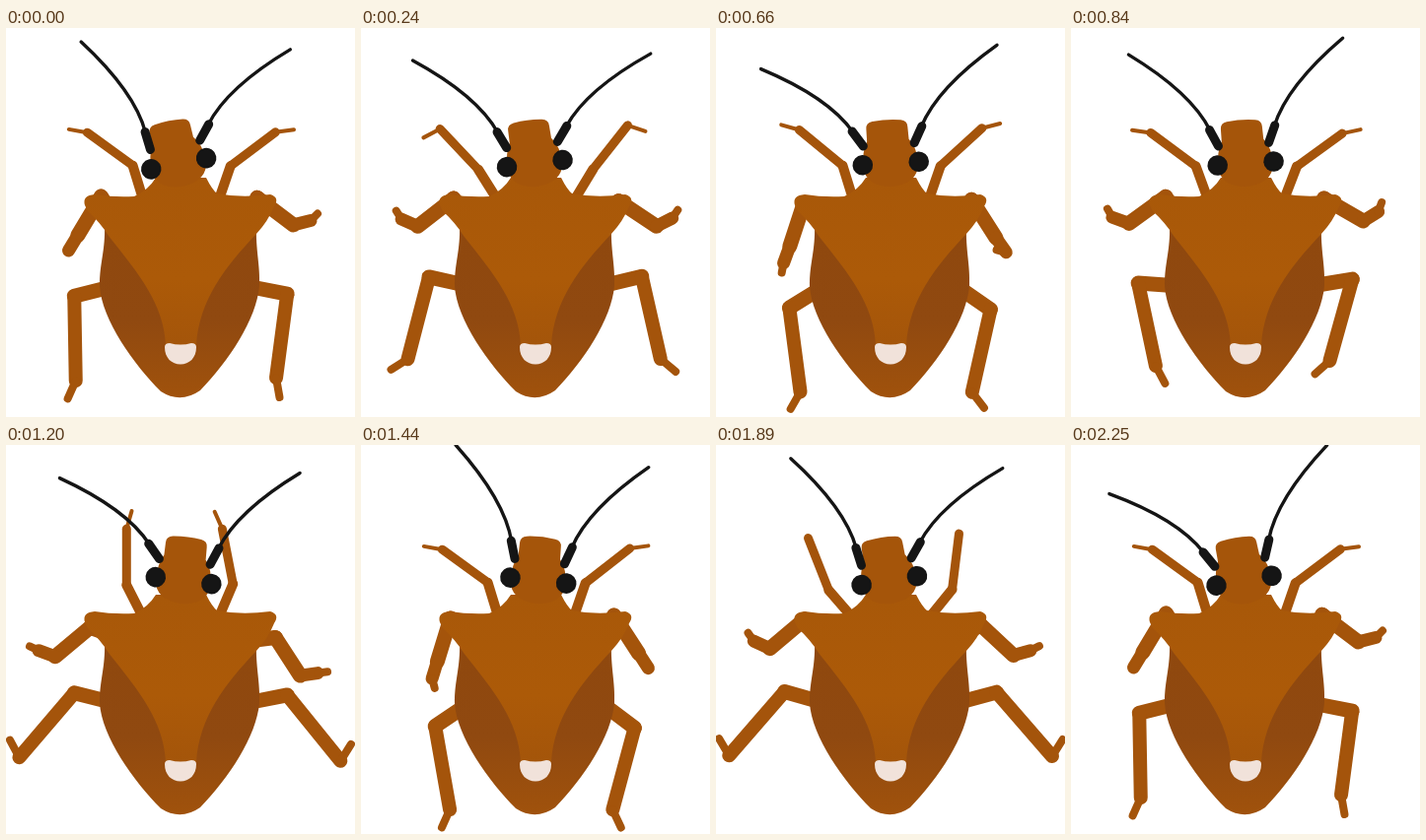
These frames come from a looping animation (354 px wide and 395 px high, 2.28 s). An HTML page:

```html
<!DOCTYPE html>
<html lang="en">
<head>
<meta charset="utf-8">
<title>Walking bug</title>
<style>
  html, body { margin: 0; width: 100%; height: 100%; overflow: hidden; background: #fff; }
  svg { display: block; width: 354px; height: 395px; }
  #legs line { stroke: #a4540b; stroke-linecap: round; }
  .feeler { fill: none; stroke: #151515; stroke-linecap: round; }
</style>
</head>
<body>
<svg viewBox="0 0 354 395">
  <defs>
    <linearGradient id="shell" x1="0" y1="0" x2="0" y2="1">
      <stop offset="0" stop-color="#8f480e"/>
      <stop offset=".55" stop-color="#904910"/>
      <stop offset="1" stop-color="#a0520c"/>
    </linearGradient>
    <linearGradient id="shield" x1="0" y1="0" x2="0" y2="1">
      <stop offset="0" stop-color="#a85809"/>
      <stop offset=".6" stop-color="#ac5a08"/>
      <stop offset="1" stop-color="#a4550a"/>
    </linearGradient>
    <g id="feeler" class="feeler">
      <path d="M20 6Q61 19 133 0" stroke-width="3.4"/>
      <path d="M3 1L21 6" stroke-width="9"/>
    </g>
  </defs>
  <g id="legs"></g>
  <path fill="url(#shell)" d="M100 200C101 226 95 238 95 262C97 296 130 342 157 369Q177 382 197 368C226 338 254 296 257 262C258 240 253 226 254 200Z"/>
  <path fill="url(#shield)" d="M80 180Q77 170 90 169Q108 172 130 171Q144 165 152 152L203 152Q209 164 214 168Q238 173 268 169Q278 172 272 181Q266 196 254 209C222 243 196 276 193 322L162 322C160 280 135 250 104 211Q96 198 83 186Z"/>
  <path fill="#f1e2da" d="M161 324Q161 320 166 320Q177 323 188 320Q193 320 193 324C193 335 186 341.500 177 341.500S161 335 161 324Z"/>
  <g id="head">
    <path fill="#a5550a" d="M155.500 101Q155.500 95 162 94Q177 92 191 94Q197.500 95 197.500 101L198 114Q206 123 206 140Q204 160 178 161Q152 160 150 140Q150 123 155.500 114Z"/>
    <use id="feelerL" href="#feeler"/>
    <use id="feelerR" href="#feeler"/>
    <circle cx="149.700" cy="137.500" r="10.300" fill="#151515"/>
    <circle cx="206.700" cy="137.500" r="10.300" fill="#151515"/>
  </g>
</svg>
<script>
const LOOP = 2280, STEP = 30, STRIDE = 750;
const strideKeys = [0, 90, 390, 450, 480, 690];
const headKeys = [0, 480, 840, 1200, 1440, 1890, 2250];
const $ = id => document.getElementById(id);

// Smooth cyclic track through angles without overshoot.
function track(keys, vals, period) {
  const n = keys.length;
  const span = keys.map((k, i) => (i < n - 1 ? keys[i + 1] : period) - k);
  const rise = vals.map((v, i) => {
    if (i < n - 1) return vals[i + 1] - v;
    const d = vals[0] - v;
    return d - 360 * Math.round(d / 360);
  });
  const rate = rise.map((r, i) => r / span[i]);
  const slope = rate.map((b, i) => {
    const a = rate[(i + n - 1) % n];
    return a * b > 0 ? 2 * a * b / (a + b) : 0;
  });
  return t => {
    t %= period;
    let i = n - 1;
    while (keys[i] > t) i--;
    const u = (t - keys[i]) / span[i], w = 1 - u;
    return vals[i] + rise[i] * u * u * (3 - 2 * u)
      + span[i] * u * w * (slope[i] * w - slope[(i + 1) % n] * u);
  };
}

// Leg kinds: [length, width] of each segment from the hip outwards.
const front = [[39, 10], [57, 9], [19, 4]];
const middle = [[28.5, 15], [46, 15], [18, 13], [10, 8]];
const rear = [[42, 15], [86, 14], [20, 8]];

const legs = [];
function leg(x, y, kind, ...angles) {
  const parts = kind.map(([len, width], i) => {
    const el = document.createElementNS("http://www.w3.org/2000/svg", "line");
    el.setAttribute("stroke-width", width);
    $("legs").append(el);
    return { el, len, angle: track(strideKeys, angles[i], STRIDE) };
  });
  legs.push({ x, y, parts });
}

leg(140, 177, front,
  [253, 250, 229, 243, 247, 253],
  [216, 216.5, 248.5, 270, 278, 216],
  [190, 188, 68, -74, -62, -170]);
leg(215, 177, front,
  [-71, -69, -51, -67, -70, -71],
  [-37, -36, -83, -101, -105, -38],
  [-8, -12, 97, 246, 238, 352]);
leg(112, 195, middle,
  [237, 236, 219, 200, 193, 222],
  [121, 144, 140, 140, 136, 107],
  [121, 200, 205, 200, 190, 107],
  [-60, -120, -125, -155, -163, -285]);
leg(245, 199, middle,
  [-70, -66, -36, -7, -3, -66],
  [37, 30, 43, 57, 59, 57],
  [-14, -32, -16, -8, 0, 57],
  [-45, -70, -27, -8, -8, 235]);
leg(110, 262, rear,
  [166, 184, 196, 194, 191.5, 146],
  [89, 78, 131, 130.5, 129.5, 80],
  [114, 62, 239.5, 242, 235.5, 114]);
leg(244, 262, rear,
  [11, -9.5, -15, -11, -9.6, 37],
  [97.5, 105.5, 49, 51, 53.5, 105],
  [80, 138, -58, -58, -49, 65]);

const tilt = track(headKeys, [-11.3, -3, -4, 7, 6, -9, -10], LOOP);
const swingL = track(headKeys, [249, 212, 230, 212.5, 237, 246, 225], LOOP);
const swingR = track(headKeys, [-34.3, -41.4, -51.2, -53, -55.4, -36, -51.5], LOOP);

function draw(t) {
  for (const { x, y, parts } of legs) {
    let px = x, py = y;
    for (const { el, len, angle } of parts) {
      const a = angle(t) * Math.PI / 180;
      const qx = px + len * Math.cos(a), qy = py + len * Math.sin(a);
      el.setAttribute("x1", px);
      el.setAttribute("y1", py);
      el.setAttribute("x2", qx);
      el.setAttribute("y2", qy);
      px = qx;
      py = qy;
    }
  }
  $("head").setAttribute("transform", `rotate(${tilt(t)} 178 153)`);
  $("feelerL").setAttribute("transform", `translate(153 121) rotate(${swingL(t)})`);
  $("feelerR").setAttribute("transform", `translate(202 121) rotate(${swingR(t)}) scale(1 -1)`);
}

const start = performance.now();
function tick() {
  const t = (performance.now() - start) % LOOP;
  draw(Math.floor(t / STEP) * STEP);
  requestAnimationFrame(tick);
}
tick();
</script>
</body>
</html>
```
